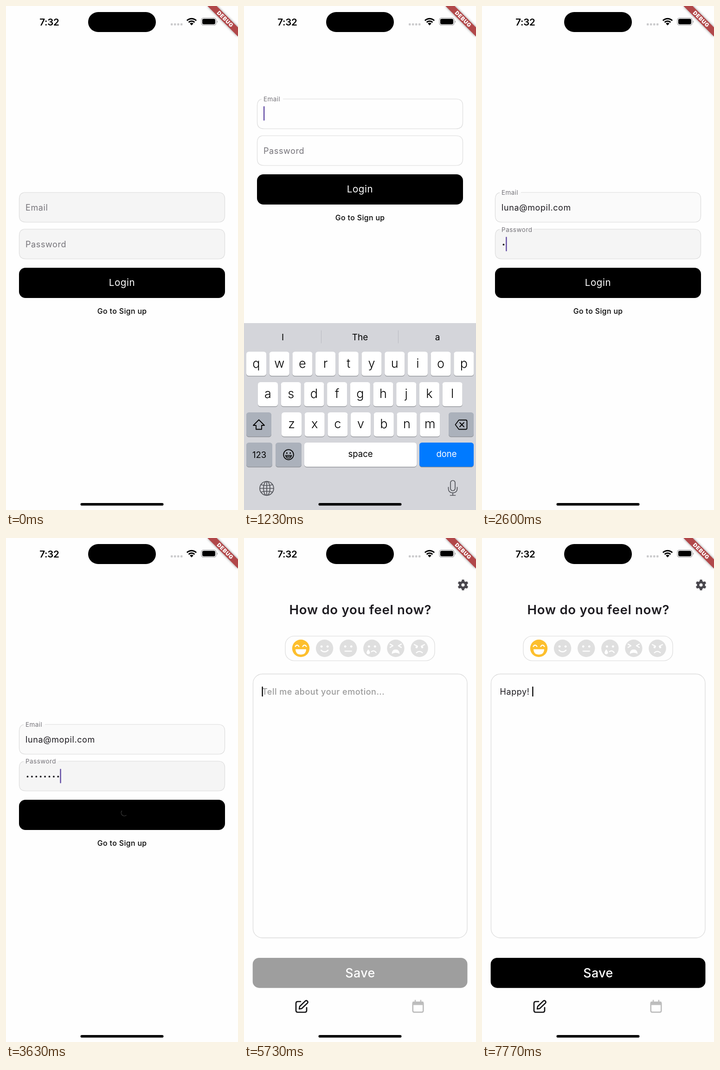
Write an HTML page that moves like this. It is 500 px wide and 1084 px high and loops after 8 s.

```html
<!DOCTYPE html>
<html lang="en">
<head>
<meta charset="utf-8">
<title>Mood diary</title>
<style>
html, body { margin: 0; width: 100%; height: 100%; overflow: hidden; background: #fefefe; }
svg { display: block; width: 500px; height: 1084px; }
text { font-family: Inter, "Open Sans", sans-serif; white-space: pre; }
.mid { text-anchor: middle; }
.body { font-size: 18px; letter-spacing: .6px; }
.line { fill: none; stroke-linecap: round; stroke-linejoin: round; }
</style>
</head>
<body>
<svg id="stage" viewBox="0 0 500 1084" xmlns="http://www.w3.org/2000/svg"></svg>
<script>
const LOOP = 8000;
const STEP = 1000 / 30;
const EMAIL = 'luna@mopil.com';
const NOTE = 'Happy! ';
const NOTE_TIMES = [6170, 6300, 6670, 6790, 6900, 7020, 7270];
const INK = '#1d1b20', PURPLE = '#5b44a0', EDGE = '#dcdcdc';

// ---------- markup helpers ----------
const rect = (x, y, w, h, r, fill, more = '') =>
  `<rect x="${x}" y="${y}" width="${w}" height="${h}" rx="${r}" fill="${fill}" ${more}/>`;
const circle = (x, y, r, fill, more = '') =>
  `<circle cx="${x}" cy="${y}" r="${r}" fill="${fill}" ${more}/>`;
const line = (d, color, w, more = '') =>
  `<path class="line" d="${d}" stroke="${color}" stroke-width="${w}" ${more}/>`;
const text = (x, y, str, size, fill, more = '') =>
  `<text x="${x}" y="${y}" font-size="${size}" fill="${fill}" ${more}>${str}</text>`;
const at = (x, y, inner, id = '') =>
  `<g ${id && `id="${id}"`} transform="translate(${x} ${y})">${inner}</g>`;

// ---------- status bar and overlays ----------
function statusBar() {
  const arc = r => {
    const k = r * .707;
    return `M${400 - k} ${41.5 - k}A${r} ${r} 0 0 1 ${400 + k} ${41.5 - k}`;
  };
  const signal = [0, 1, 2, 3].map(i => rect(355 + i * 7, 37.3, 4.4, 4.4, 1.3, '#cacacc')).join('');
  return text(72.3, 41.5, '7:32', 20.5, '#000', 'font-weight="600" letter-spacing="-.3"') +
    rect(177, 13, 146, 43, 21.5, '#000') + signal +
    `<path d="M400 41.8L396 37.6A5.8 5.8 0 0 1 404 37.6Z"/>` +
    line(arc(9), '#000', 2.9, 'style="stroke-linecap:butt"') +
    line(arc(14.2), '#000', 2.9, 'style="stroke-linecap:butt"') +
    rect(421, 25.5, 32, 16, 5, 'none', 'stroke="#a2a2a4" stroke-width="1.2"') +
    rect(423, 27.5, 28, 12, 3.4, '#000') +
    '<path d="M454.6 31v5.4q1.7-.8 1.7-2.7t-1.7-2.7z" fill="#a2a2a4"/>';
}

function banner() {
  return '<path d="M434.2 0H454L500 46V65.8Z" fill="#b1474a" filter="url(#shade)"/>' +
    `<g transform="translate(472.2 27.8) rotate(45)">${
      text(.4, 4.2, 'DEBUG', 11.6, '#fff', 'class="mid" font-weight="900" letter-spacing=".8"')}</g>`;
}

// ---------- login page ----------
function field(id, name) {
  return `<rect id="${id}Fill" x="28.5" y="0" width="443" height="64" rx="14"/>` +
    `<path id="${id}Edge" fill="none" stroke="${EDGE}" stroke-width="1.2"/>` +
    `<g id="${id}Label"><text class="body" y="6.5" fill="#76747a">${name}</text></g>`;
}

function loginPage() {
  const dots = Array.from({ length: 8 }, (_, i) =>
    circle(46.5 + i * 9.4, 33.2, 1.9, INK, 'class="dot"')).join('');
  return rect(0, 0, 500, 1084, 0, '#fefefe') + '<g id="form">' +
    at(0, 401, field('mail', 'Email') +
      `<text id="mailText" class="body" x="42" y="38.6" fill="${INK}"></text>` +
      rect(0, 15.5, 2.3, 31, 1, PURPLE, 'id="mailCaret"')) +
    at(0, 480, field('pass', 'Password') + dots +
      rect(0, 16.5, 2.3, 31, 1, PURPLE, 'id="passCaret"')) +
    rect(28, 563, 444, 65, 14, '#000') +
    text(250, 602.3, 'Login', 20.5, '#fff', 'id="login" class="mid" letter-spacing=".6"') +
    `<g id="spinner">${line('M-5.5 -4A6.8 6.8 0 0 0 4 5.5', '#3a3a3a', 1.3)}</g>` +
    text(250.2, 662, 'Go to Sign up', 15.8, '#000', 'class="mid" font-weight="500" letter-spacing=".4"') +
    '</g>';
}

// ---------- keyboard, y measured from its top edge ----------
function keyboard() {
  const GREY = '#abb1bb';
  const key = (x, y, w, fill = '#fff') =>
    rect(x, y + 1.3, w, 52, 5.5, '#8b8d92') + rect(x, y, w, 52, 5.5, fill);
  const row = (chars, x, y) => [...chars].map((c, i) => key(x + i * 49.7, y, 43) +
    text(x + i * 49.7 + 21.5, y + 34, c, 27, '#000', 'class="mid" font-weight="300"')).join('');
  const word = (x, y, s, fill = '#000', size = 18.5) => text(x, y, s, size, fill, 'class="mid"');
  const globe = circle(0, 0, 15, 'none') +
    '<ellipse rx="7" ry="15"/><path d="M0-15V15M-15 0H15M-12.5-8Q0-4 12.5-8M-12.5 8Q0 4 12.5 8"/>';
  return rect(0, 0, 500, 404, 0, '#d4d5da') +
    word(83.5, 36.5, 'I', '#000', 19) + word(250, 36.5, 'The', '#000', 19) + word(417, 36.5, 'a', '#000', 19) +
    line('M166.5 16V43M332.5 16V43', '#b9bbc2', 1) +
    row('qwertyuiop', 5, 61.5) + row('asdfghjkl', 30, 127) + row('zxcvbnm', 81, 192) +
    key(5, 192, 54, GREY) + key(441, 192, 54, GREY) +
    line('M32 208L44 220H38V228.5H26V220H20Z', '#000', 1.8) +
    line('M463 208.5H478Q480.5 208.5 480.5 211V226Q480.5 228.5 478 228.5H463L455.5 218.5Z' +
      'M465 214L474 223M474 214L465 223', '#000', 1.8) +
    key(5, 257, 56, GREY) + word(33, 289.5, '123') +
    key(68, 257, 56, GREY) +
    at(96, 283, circle(0, 0, 10.8, 'none', 'stroke="#000" stroke-width="1.8"') +
      circle(-3.7, -3.4, 1.6, '#000') + circle(3.7, -3.4, 1.6, '#000') +
      line('M-6.5 1.5H6.5Q5.5 7.5 0 7.5T-6.5 1.5ZM-5 4H5', '#000', 1.5)) +
    key(130, 257, 242) + word(251, 288, 'space') +
    key(378, 257, 117, '#007aff') + word(436.5, 288, 'done', '#fff') +
    at(49, 355.5, `<g fill="none" stroke="#505258" stroke-width="1.7">${globe}</g>`) +
    at(450, 355, rect(-5, -16.5, 10, 22, 5, 'none', 'stroke="#505258" stroke-width="1.7"') +
      line('M-9.5-2V1Q-9.5 10 0 10T9.5 1V-2M0 10V15.5M-5.5 15.5H5.5', '#505258', 1.7));
}

// ---------- diary page ----------
function faces() {
  const W = '#fff';
  const eyes = circle(-6.5, -4, 2.4, W) + circle(6.5, -4, 2.4, W);
  const looks = [
    line('M-12-4Q-8-10-4-4M4-4Q8-10 12-4', W, 2.2) +
      '<path d="M-11.5 2H11.5Q11 13.5 0 13.5T-11.5 2Z" fill="#fff"/>',
    eyes + line('M-7.5 4Q0 11 7.5 4', W, 2.3),
    eyes + line('M-7 6H7', W, 2.3),
    eyes + line('M-1 7Q5 3 9 9', W, 2.3) +
      '<path d="M-8 2Q-3.5 8-4.5 10.5A3.8 3.8 0 0 1-11.5 10.5Q-12.5 8-8 2Z" fill="#fff"/>',
    line('M-12-9L-6-5.5L-12-2M12-9L6-5.5L12-2', W, 2.3) +
      '<path d="M-8.5 12Q-8 2.5 0 2.5T8.5 12Q0 7 -8.5 12Z" fill="#fff"/>',
    circle(-6, -2.5, 2.4, W) + circle(6, -2.5, 2.4, W) +
      line('M-11-8L-4-4.5M11-8L4-4.5M-6.5 9.5Q0 3.5 6.5 9.5', W, 2.2)
  ];
  return looks.map((look, i) =>
    at(122.5 + i * 51.1, 237.3, circle(0, 0, 18.7, i ? '#dfdfdf' : '#fdbf2d') + look)).join('');
}

function diaryPage() {
  const teeth = [0, 60, 120, 180, 240, 300].map(a =>
    `<path d="M-2.3-11.5H2.3L3.6-6H-3.6Z" fill="#49474d" transform="rotate(${a})"/>`).join('');
  return rect(0, 0, 500, 1084, 0, '#fefefe') +
    at(472, 101, circle(0, 0, 6.1, 'none', 'stroke="#49474d" stroke-width="5"') + teeth) +
    text(250.9, 164, 'How do you feel now?', 27.6, INK, 'class="mid" font-weight="600" letter-spacing=".7"') +
    rect(89, 211, 322, 53, 19, '#fefefe', `stroke="${EDGE}" stroke-width="1.2"`) + faces() +
    rect(19.5, 292.5, 461.5, 567.5, 20, '#fefefe', `stroke="${EDGE}" stroke-width="1.3"`) +
    text(39, 337.3, 'Tell me about your emotion...', 18, '#9a9a9a',
      'id="hint" font-weight="500" letter-spacing=".5"') +
    `<text id="note" class="body" x="38.5" y="337.3" fill="${INK}"></text>` +
    rect(0, 319.5, 2.3, 21.5, 1, '#000', 'id="noteCaret"') +
    rect(18.7, 903, 462.8, 64.7, 14, '#9e9e9e', 'id="save"') +
    text(250.5, 945.3, 'Save', 26.8, '#fff', 'class="mid" font-weight="500" letter-spacing=".5"') +
    line('M122 997H116Q112 997 112 1001V1016Q112 1020 116 1020H131Q135 1020 135 1016V1010', '#151517', 2.7) +
    line('M119 1013L120 1007.5L132.5 995.5Q134.5 994 136.5 996T137 1000L124.5 1012Z', '#151517', 2.5) +
    rect(363.8, 998.3, 22.5, 21.5, 3, 'none', 'stroke="#bdbdbd" stroke-width="2.7"') +
    rect(363, 997, 24, 7.5, 2, '#bdbdbd') +
    line('M369 994.5V998M381 994.5V998', '#bdbdbd', 2.6);
}

const stage = document.getElementById('stage');
stage.innerHTML =
  '<defs><filter id="shade" x="-30%" y="-30%" width="160%" height="160%">' +
  '<feDropShadow dx="0" dy="0" stdDeviation="2.6" flood-color="#000" flood-opacity=".5"/></filter></defs>' +
  at(0, 0, loginPage(), 'loginPage') + at(500, 0, diaryPage(), 'diaryPage') +
  at(0, 1084, keyboard(), 'keys') + statusBar() +
  rect(160.5, 1069, 179, 5.6, 2.8, '#000') + banner();

const el = {};
stage.querySelectorAll('[id]').forEach(n => el[n.id] = n);
const dots = [...stage.querySelectorAll('.dot')];

// ---------- motion ----------
const clamp = v => Math.max(0, Math.min(1, v));
const ramp = (t, from, to) => clamp((t - from) / (to - from));
const easeOut = v => 1 - (1 - v) ** 3;
const spring = ms => ms <= 0 ? 0 : 1 - (1 + .038 * ms) * Math.exp(-.038 * ms);
const lift = t => t < 1275 ? spring(t - 588.8) : 1 - spring(t - 1275);
const move = (node, x, y) => node.setAttribute('transform', `translate(${x} ${y})`);
const show = (node, v) => node.setAttribute('opacity', +v);

// the screen refreshes 30 times a second, stamped in 10 ms units
const snap = t => Math.round(Math.floor((t + 5) / STEP) * STEP / 10) * 10;

function pageCurve(v) {
  if (v <= 0 || v >= 1) return clamp(v);
  const bez = (a, b, s) => 3 * a * s * (1 - s) ** 2 + 3 * b * s * s * (1 - s) + s ** 3;
  let lo = 0, hi = 1;
  for (let i = 0; i < 24; i++) {
    const m = (lo + hi) / 2;
    if (bez(.35, .33, m) < v) lo = m; else hi = m;
  }
  return bez(.91, .97, lo);
}

function drawField(id, up, gapEnd, fill) {
  const right = 38 + (gapEnd - 38) * up;
  el[id + 'Edge'].setAttribute('d', `M${right} 0H457Q471.5 0 471.5 14V50Q471.5 64 457 64` +
    'H43Q28.5 64 28.5 50V14Q28.5 2 38 .3');
  el[id + 'Label'].setAttribute('transform',
    `translate(42 ${32 - 32 * up}) scale(${1 - .25 * up})`);
  el[id + 'Fill'].setAttribute('fill', fill);
}

function typeInto(node, caret, str) {
  if (node.textContent !== str) node.textContent = str;
  const x = +node.getAttribute('x') + (str ? node.getComputedTextLength() : 0);
  caret.setAttribute('x', x);
}

function render(t) {
  move(el.form, 0, -201 * lift(t + 1));
  move(el.keys, 0, 1084 - 402 * lift(t));

  const raised = t >= 570 && t < 1400;
  drawField('mail', easeOut(ramp(t, 570, 660)), 84, t < 570 ? '#f5f5f5' : raised ? '#fefefe' : '#fafafa');
  drawField('pass', easeOut(ramp(t, 2500, 2640)), 113, raised ? '#fefefe' : '#f5f5f5');

  const typed = t < 1460 ? 0 : Math.min(EMAIL.length, 1 + Math.floor((t - 1460) / 72));
  typeInto(el.mailText, el.mailCaret, EMAIL.slice(0, typed));
  show(el.mailCaret, t >= 600 && t < 2500);

  const secret = t < 2600 ? 0 : Math.min(8, 1 + Math.floor((t - 2600) / 58));
  dots.forEach((d, i) => show(d, i < secret));
  el.passCaret.setAttribute('x', 42 + 9.3 * secret);
  show(el.passCaret, t >= 2500);

  show(el.login, t < 3300);
  show(el.spinner, t >= 3300);
  el.spinner.setAttribute('transform', `translate(255 591) rotate(${(t - 3630) * .4})`);

  const p = pageCurve(ramp(t, 3660, 4100));
  move(el.loginPage, -166.7 * p, 0);
  move(el.diaryPage, 500 * (1 - p), 0);

  const count = NOTE_TIMES.filter(s => t >= s).length;
  typeInto(el.note, el.noteCaret, NOTE.slice(0, count));
  show(el.hint, count === 0);
  let caret = t >= 5730 ? 1 : 0;
  if (t >= 6000 && t < 6170) caret = 1 - ramp(t, 5980, 6030);
  if (t >= 7530) caret = 1 - ramp(t, 7510, 7600) + ramp(t, 7700, 7770);
  show(el.noteCaret, caret);

  const grey = Math.round(158 * (1 - ramp(t, 6170, 6390)));
  el.save.setAttribute('fill', `rgb(${grey},${grey},${grey})`);
}

const start = performance.now();
function tick() {
  render(snap((performance.now() - start) % LOOP));
  requestAnimationFrame(tick);
}
tick();
</script>
</body>
</html>
```
